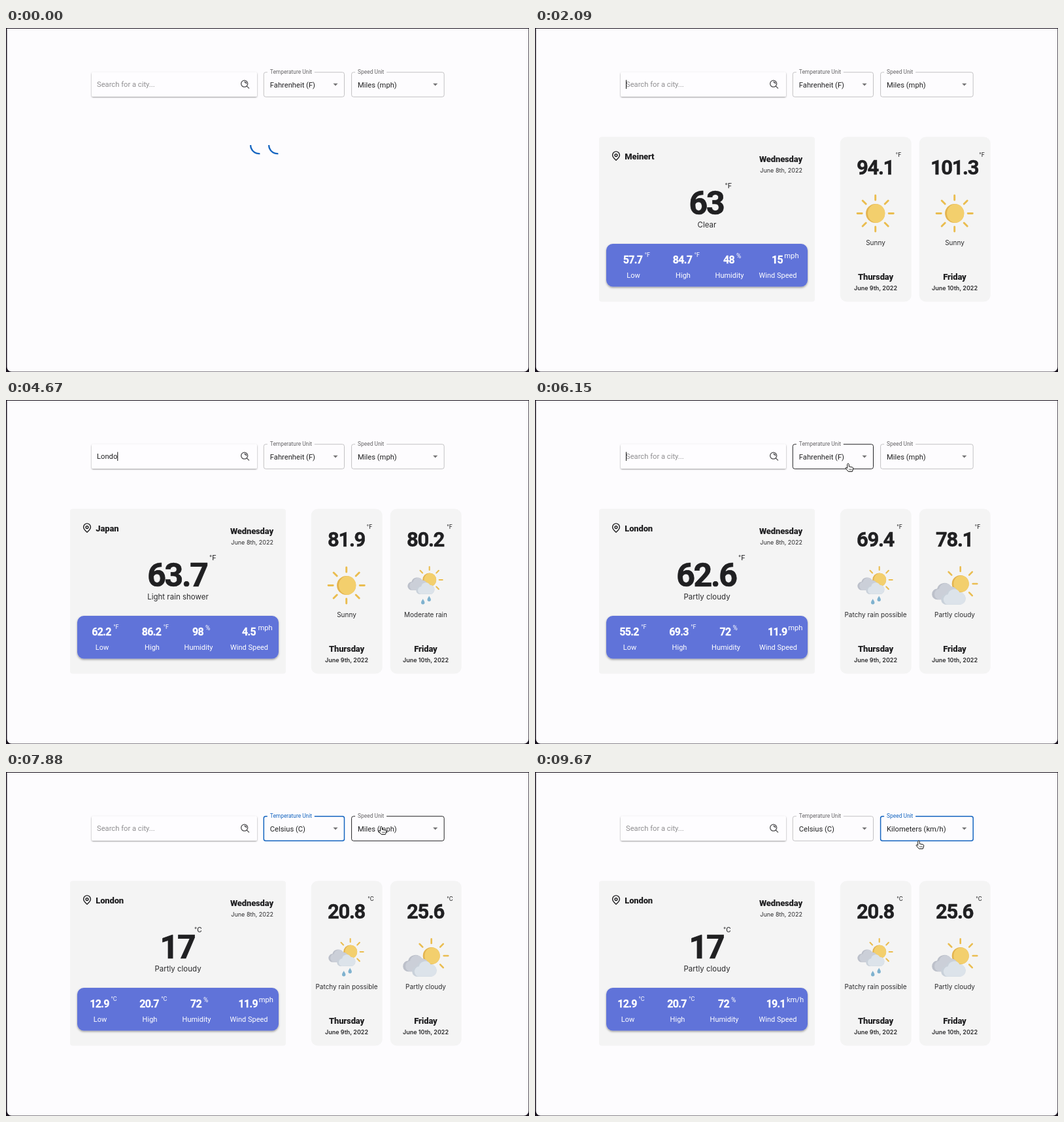
An HTML page for the animation above (9.91 s loop, 800 px wide and 526 px high).

```html
<!DOCTYPE html>
<html lang="en">
<head>
<meta charset="utf-8">
<title>Weather dashboard</title>
<style>
html, body { margin: 0; width: 100%; height: 100%; overflow: hidden; background: #fdfcfe; }
svg { display: block; width: 800px; height: 526px; font-family: Roboto, sans-serif; }
.body { font-family: Inter, sans-serif; fill: #2b2b2d; }
.head { font-weight: 900; font-size: 13px; letter-spacing: -.15px; fill: #202022; }
.num { font-weight: 700; letter-spacing: -.045em; stroke-linejoin: round; }
.mid { text-anchor: middle; }
.end { text-anchor: end; }
</style>
</head>
<body>
<svg viewBox="0 0 800 526">
  <defs>
    <filter id="soft" x="-20%" y="-40%" width="140%" height="190%">
      <feDropShadow dx="0" dy="1.5" stdDeviation="1.5" flood-opacity=".38"/>
    </filter>
    <filter id="lift" x="-20%" y="-40%" width="140%" height="200%">
      <feDropShadow dx="0" dy="2" stdDeviation="3" flood-opacity=".35"/>
    </filter>
    <filter id="paper" x="-10%" y="-30%" width="120%" height="170%">
      <feDropShadow dx="0" dy="1" stdDeviation=".8" flood-opacity=".4"/>
    </filter>
  </defs>
  <rect width="800" height="526" fill="#1b1420"/>
  <path d="M1.5 1H799.3V518.5a7 7 0 0 1-7 7H8.5a7 7 0 0 1-7-7Z" fill="#fdfcfe"/>
  <rect x="131" y="67.5" width="253" height="37.5" rx="2.5" fill="#fefdff" filter="url(#paper)"/>
  <g fill="none" stroke="#4c4c4e" stroke-width="1.3" stroke-linecap="round">
    <circle cx="364.7" cy="85.2" r="5"/>
    <path d="M368.4 88.9l3.2 3.2M364.9 82.5a2.7 2.7 0 0 1 2.6 2.6"/>
  </g>
  <g id="cards"></g>
  <g id="spin"></g>
  <text id="query" x="139" y="90" font-size="11.2"></text>
  <rect id="caret" y="79.5" width="1" height="13.5" fill="#111"/>
  <g id="ui"></g>
  <g id="mouse"></g>
</svg>
<script>
const LOOP = 9910;
const BLUE = "#1565c0";
const $ = id => document.getElementById(id);

// Moments of the session, in ms
const LOADED = 450, FOCUS = 900, OPEN_TEMP = 6450, PICK_TEMP = 7100, OPEN_SPEED = 8350, PICK_SPEED = 9050;
const FADE = 220, TEMP_SET = 7270, SPEED_SET = 9180;
const searches = [
  { word: "Japan", keys: [1060, 1210, 1380, 1540, 1700], enter: 2000 },
  { word: "London", keys: [3910, 4090, 4270, 4450, 4620, 4790], enter: 5090 }
];
const taps = [FOCUS, ...searches.flatMap(s => [...s.keys, s.enter])];

const london = { city: "London", sky: "Partly cloudy", next: ["Patchy rain possible", "Partly cloudy"] };
const states = [
  { at: LOADED, city: "Meinert", sky: "Clear", unit: "°F", now: "63", next: ["Sunny", "Sunny"], temps: ["94.1", "101.3"],
    stats: ["57.7", "84.7", "48", "15"], cols: [150.5, 226.5, 297.5, 371.5], wind: 370.5, speed: "mph" },
  { at: 2300, city: "Japan", sky: "Light rain shower", unit: "°F", now: "63.7", next: ["Sunny", "Moderate rain"], temps: ["81.9", "80.2"],
    stats: ["62.2", "86.2", "98", "4.5"], cols: [147, 223.5, 294.5, 372], wind: 371.5, speed: "mph" },
  { at: 5300, ...london, unit: "°F", now: "62.6", temps: ["69.4", "78.1"],
    stats: ["55.2", "69.3", "72", "11.9"], cols: [145, 221, 292, 372], wind: 370.7, speed: "mph" },
  { at: TEMP_SET, ...london, unit: "°C", now: "17", temps: ["20.8", "25.6"],
    stats: ["12.9", "20.7", "72", "11.9"], cols: [144, 220, 291.5, 371.5], wind: 370.2, speed: "mph" },
  { at: SPEED_SET, ...london, unit: "°C", now: "17", temps: ["20.8", "25.6"],
    stats: ["12.9", "20.7", "72", "19.1"], cols: [142, 218, 289.5, 371.5], wind: 368.3, speed: "km/h" }
];

// Mouse trail: time, x, y
const trail = [
  [620, 300, 150], [860, 247, 89], [5600, 247, 89], [6130, 479, 97], [6600, 479, 97], [6900, 493, 77],
  [7450, 493, 77], [8000, 585, 84], [8450, 587, 86], [8610, 587, 98], [8780, 587, 105]
];

const smooth = p => p * p * (3 - 2 * p);
const clamp = v => Math.max(0, Math.min(1, v));

function put(id, html) {
  const el = $(id);
  if (el.last !== html) el.innerHTML = el.last = html;
}

const text = (x, y, s, size, cls = "", extra = "") =>
  `<text x="${x}" y="${y}" font-size="${size}" class="${cls}" ${extra}>${s}</text>`;
const rect = (x, y, w, h, r, extra) =>
  `<rect x="${x}" y="${y}" width="${w}" height="${h}" rx="${r}" ${extra}/>`;

// Number centred on x, followed by its raised unit
function figure(x, y, s, size, fill, unit, unitY, unitSize, gap) {
  const k = size / 50;
  const w = [...s].reduce((sum, c) => sum + (c === "." ? 15 : c === "1" ? 21 : 26), 0) * k;
  return text(x, y, s, size, "num mid", `fill="${fill}" stroke="${fill}" stroke-width="${0.6 * k + 0.1}"`) +
    text(x + w / 2 + gap, unitY, unit, unitSize, "", `fill="${fill}"`);
}

function sun(x, y, r, angles, from, to) {
  const rays = angles.map(a => {
    const c = Math.cos(a * Math.PI / 180), s = Math.sin(a * Math.PI / 180);
    return `M${x + c * from} ${y + s * from}L${x + c * to} ${y + s * to}`;
  }).join("");
  const d = r * 0.2;
  return `<path d="${rays}" stroke="#eabd50" stroke-width="${r * 0.2}" stroke-linecap="round"/>
    <circle cx="${x}" cy="${y}" r="${r}" fill="#e3b44f"/>
    <ellipse cx="${x + d / 2}" cy="${y}" rx="${r - d / 2}" ry="${r * 0.97}" fill="#f3cf6d"/>`;
}

function cloud(x, y, k, dark, light) {
  const d = "M8 26a8 8 0 0 1-1-16a11 11 0 0 1 20-3a9.5 9.5 0 0 1 1 19z";
  return `<g transform="translate(${x} ${y}) scale(${k})"><path d="${d}" fill="${dark}"/>
    <path d="${d}" fill="${light}" transform="translate(3.6 .6) scale(.9 .97)"/></g>`;
}

const backCloud = (x, y, k) => cloud(x, y, k, "#bcc0ca", "#cbcfd8");
const frontCloud = (x, y, k) => cloud(x, y, k, "#c9d1da", "#dce3ea");
const drop = (x, y) =>
  `<path d="M${x} ${y}c1.2 2.4 2.7 4 2.7 5.8a2.7 2.7 0 0 1-5.4 0c0-1.8 1.5-3.4 2.7-5.8z" fill="#7fb2cf"/>`;

function skyIcon(x, sky) {
  const partRays = [-135, -90, -45, 0, 45];
  if (sky === "Sunny") return sun(x, 283.5, 14.6, [0, 45, 90, 135, 180, 225, 270, 315], 20.5, 27.6);
  if (sky === "Partly cloudy")
    return sun(x + 9, 281, 13, partRays, 19, 25.6) + backCloud(x - 34, 278, 1.05) + frontCloud(x - 20, 287, 1);
  return sun(x + 6, 275, 10.5, partRays, 15, 20) + backCloud(x - 27, 270, 0.8) + frontCloud(x - 14, 277.5, 0.75) +
    drop(x - 4, 304) + drop(x + 5.5, 299.5);
}

function forecast(i, s) {
  const x = [521, 642][i];
  return rect(x - 54.3, 166.5, 109, 252, 10, 'fill="#f4f4f4"') +
    figure(x - 0.5, 224, s.temps[i], 31, "#202022", s.unit, 197, 9, 4) + skyIcon(x - 0.3, s.next[i]) +
    text(x, 332, s.next[i], 10, "body mid") +
    text(x, 385, ["Thursday", "Friday"][i], 13, "head mid") +
    text(x, 401, ["June 9th, 2022", "June 10th, 2022"][i], 9, "body mid", 'font-weight="600"');
}

function cards(s) {
  const stats = ["Low", "High", "Humidity", "Wind Speed"].map((label, i) => {
    const last = i === 3;
    const unit = last ? s.speed : i === 2 ? "%" : s.unit;
    const size = [9, 9, 10, 11.2][i];
    return figure(last ? s.wind : s.cols[i] - 1, 360, s.stats[i], 16, "#fff", unit, i < 2 ? 349.5 : 351.5, size, 3.3) +
      text(s.cols[i], 382, label, 11, "mid", 'fill="#fff"');
  }).join("");
  return rect(98, 166.5, 330, 252, 4, 'fill="#f4f4f4"') +
    `<g fill="none" stroke="#1c1c1e" stroke-width="1.4" stroke-linejoin="round">
      <path d="M124 202.3c-3.3-2.8-5.4-5.3-5.4-8a5.4 5.4 0 0 1 10.8 0c0 2.7-2.1 5.2-5.4 8z"/>
      <circle cx="124" cy="194.6" r="1.9"/></g>` +
    text(137.3, 201.3, s.city, 13, "head") +
    text(409, 204.5, "Wednesday", 13, "head end") +
    text(409, 221, "June 8th, 2022", 9, "body end") +
    figure(262, 284.5, s.now, 50, "#202022", s.unit, 244.5, 11.2, 2.5) +
    text(263, 305, s.sky, 11.5, "body mid") +
    rect(109, 330, 308, 65.5, 10, 'fill="#6073d9" filter="url(#soft)"') + stats +
    forecast(0, s) + forecast(1, s);
}

function select(x, w, label, gap, value, focused, hovered) {
  const line = focused ? BLUE : hovered ? "#242426" : "#c3c2c4";
  const right = x + w, ax = right - 13.5;
  return rect(x, 67.7, w, 37.6, 3, `fill="none" stroke="${line}" stroke-width="${focused ? 1.5 : 1}"`) +
    rect(x + 5.5, 66, gap, 4, 0, 'fill="#fdfcfe"') +
    text(x + 9.5, 70.2, label, 8.4, "", `fill="${focused ? BLUE : "#666567"}"`) +
    text(x + 9.5, 90.5, value, 11.2, "", 'fill="#212122"') +
    `<path d="M${ax - 3.6} 84.8h7.2l-3.6 3.6z" fill="#747375"/>`;
}

function popup(x, y, w, rows, checked, lit, alpha) {
  if (alpha <= 0) return "";
  const ry = i => y + 4 + i * 18;
  return `<g opacity="${alpha.toFixed(3)}">` +
    rect(x, y, w, 43.5, 4.5, 'fill="#5a585c" stroke="#6f6d71" stroke-width=".6" filter="url(#lift)"') +
    rect(x + 3.5, ry(lit), w - 7, 18, 2.5, 'fill="#4a80ec"') +
    rows.map((r, i) => text(x + 17, ry(i) + 12.7, r, 11.2, "", 'fill="#fff"')).join("") +
    `<path d="M${x + 7} ${ry(checked) + 9.5}l2 2.8 3.6-6" fill="none" stroke="#fff" stroke-width="1.2"/></g>`;
}

function mouseAt(t) {
  if (t < trail[0][0] || (t >= searches[0].keys[0] && t < 5600)) return null;
  let i = trail.length - 1;
  while (trail[i][0] > t) i--;
  const [t0, x0, y0] = trail[i], [t1, x1, y1] = trail[i + 1] || [LOOP, x0, y0];
  const p = smooth(clamp((t - t0) / (t1 - t0)));
  return { x: x0 + (x1 - x0) * p, y: y0 + (y1 - y0) * p };
}

const within = (m, x0, x1) => !!m && m.x > x0 && m.x < x1 && m.y > 67 && m.y < 107;

function pointer(m) {
  if (!m) return "";
  let shape;
  if (within(m, 131, 384)) {
    const d = "M-2-5.2q2 0 2 1.4V3.8q0 1.4-2 1.4M2-5.2q-2 0-2 1.4V3.8q0 1.4 2 1.4M-1.3 1.5h2.6";
    shape = `<path d="${d}" fill="none" stroke="#fff" stroke-width="2.2"/><path d="${d}" fill="none" stroke="#111" stroke-width="1.1"/>`;
  } else if (within(m, 394, 518) || within(m, 528, 671)) {
    shape = `<path d="M0 .2c1 0 1.3.8 1.3 1.6v3l5 1c1.2.3 1.6 1 1.4 2.2l-.8 3-.6 1.4h-6L-3.6 7.8c-.8-1.2.3-2 1.3-1.3l1 .9V1.7c0-.9.3-1.5 1.3-1.5z"
      fill="#fff" stroke="#111" stroke-width="1"/><path d="M1.7 8v2.4M3.5 8v2.4M5.2 8v2.4" stroke="#111" stroke-width=".6"/>`;
  } else {
    shape = '<path d="M0 0v11l2.6-2.3 1.7 3.9 1.9-.8-1.7-3.8H8z" fill="#111" stroke="#fff" stroke-width=".9"/>';
  }
  return `<g transform="translate(${m.x.toFixed(2)} ${m.y.toFixed(2)})">${shape}</g>`;
}

function spinners(t) {
  const p = ((t + 270) % 1400) / 1400;
  const a = smooth(clamp(p * 2)), b = smooth(clamp(p * 2 - 1));
  return [387, 415].map(x => `<circle r="20.2" fill="none" stroke="${BLUE}" stroke-width="3.6"
    transform="translate(${x} 179.3) scale(.636) rotate(${360 * p})"
    stroke-dasharray="${1 + 99 * a} 200" stroke-dashoffset="${-15 * a - 110 * b}"/>`).join("");
}

function showQuery(t) {
  let typed = "";
  for (const s of searches)
    if (t < s.enter) typed = typed || s.word.slice(0, s.keys.filter(k => k <= t).length);
  const q = $("query"), words = typed || "Search for a city...";
  if (q.textContent !== words) q.textContent = words;
  q.setAttribute("fill", typed ? "#212122" : "#8f8e90");
  const since = t - Math.max(...taps.filter(k => k <= t));
  const on = t >= FOCUS && t < OPEN_TEMP && since % 1000 < 500;
  $("caret").setAttribute("opacity", on ? 1 : 0);
  $("caret").setAttribute("x", 139 + (typed ? q.getComputedTextLength() : 0));
}

const alphaOf = (t, open, pick) => t < open ? 0 : 1 - clamp((t - pick) / FADE);

function draw(t) {
  const state = states.filter(s => s.at <= t).pop();
  put("cards", state ? cards(state) : "");
  put("spin", state ? "" : spinners(t));
  showQuery(t);
  const m = mouseAt(t);
  const temps = ["Celsius (C)", "Fahrenheit (F)"], speeds = ["Miles (mph)", "Kilometers (km/h)"];
  put("ui",
    select(394.3, 123.2, "Temperature Unit", 72, temps[t < TEMP_SET ? 1 : 0], t >= OPEN_TEMP && t < OPEN_SPEED, within(m, 394, 518)) +
    select(528.6, 141.6, "Speed Unit", 48, speeds[t < SPEED_SET ? 0 : 1], t >= OPEN_SPEED, within(m, 528, 671)) +
    popup(388, 57.3, 125.5, temps, 1, t < 6760 ? 1 : 0, alphaOf(t, OPEN_TEMP, PICK_TEMP)) +
    popup(523, 75.2, 142.5, speeds, 0, t < 8660 ? 0 : 1, alphaOf(t, OPEN_SPEED, PICK_SPEED)));
  put("mouse", pointer(m));
}

const start = performance.now();
function tick() {
  draw((performance.now() - start) % LOOP);
  requestAnimationFrame(tick);
}
tick();
</script>
</body>
</html>
```
